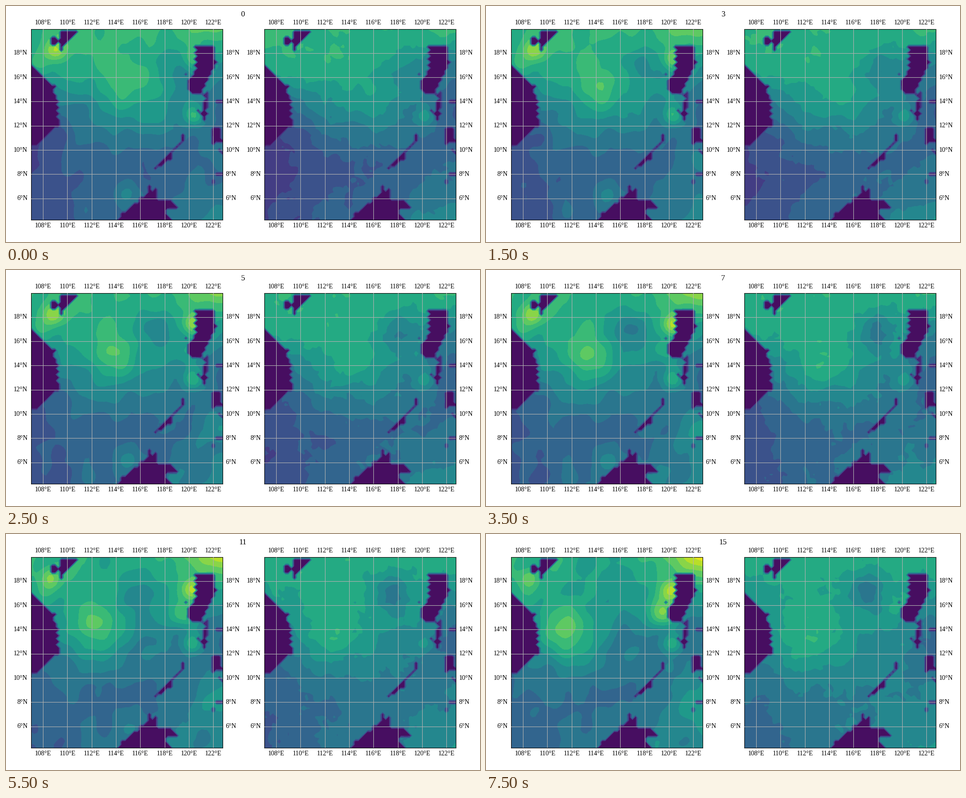
A matplotlib script for the animation above (8000 ms loop, 1000 px wide and 500 px high).

```python
import numpy as np
import matplotlib.pyplot as plt
from matplotlib.animation import FuncAnimation
from matplotlib.path import Path

plt.rcParams["font.family"] = "Liberation Serif"

FRAMES = 16
lon = 107 + np.arange(64) / 4
lat = 4.25 + np.arange(64) / 4
LON, LAT = np.meshgrid(lon, lat)
PTS = np.column_stack([LON.ravel(), LAT.ravel()])
KNOT_LON = np.array([107, 111, 116, 122.75])
KNOT_LAT = np.array([20, 17, 13, 9, 4.25])
WET = np.ones_like(LON)


def island(*coast):
    path = Path(coast + coast[:1])
    inside = path.contains_points(PTS, radius=0.02) | path.contains_points(PTS, radius=-0.02)
    WET[inside.reshape(WET.shape)] = 0


def strip(x0, y0, x1, y1, wet=0):
    """Thin chain of islands; a wet value above 0 makes it a shoal."""
    n = round(4 * max(abs(x1 - x0), abs(y1 - y0))) + 1
    for x, y in zip(np.linspace(x0, x1, n), np.linspace(y0, y1, n)):
        j, i = round((y - lat[0]) * 4), round((x - lon[0]) * 4)
        WET[j, i] = min(WET[j, i], wet)


def build_land():
    island((107, 17), (109, 15.25), (108.75, 15), (109.25, 14.25), (109.25, 12),
           (107.5, 10.5), (107, 10.5))
    island((108.75, 19.25), (109.25, 19.25), (109.5, 19.75), (110.75, 19.75),
           (109.5, 18.25), (109.25, 18.75), (108.75, 18.75))
    island((120.5, 18.5), (122, 18.5), (122.25, 17.25), (121, 14.75),
           (120.25, 14.75), (120, 15), (120, 15.75), (120.5, 16.5))
    island((120.75, 13.25), (121.5, 13), (121.25, 12.5))
    island((122, 11.75), (122.5, 11.75), (122.75, 10.75), (122, 10.5))
    island((117.5, 8.75), (117.75, 8.75), (118.5, 9.25), (118.5, 9.5), (118.25, 9.5))
    island((114.25, 4.25), (114.5, 4.75), (115.5, 5.5), (116, 5.5), (116, 6),
           (116.75, 6.5), (116.75, 7), (117, 6.5), (117.25, 6.75), (117.5, 5.75),
           (118.5, 5.75), (119, 5.25), (118, 5), (118.5, 4.25))
    strip(117.25, 8.5, 119.5, 10.75)
    strip(119.5, 10.75, 119.5, 11.25)
    strip(121.25, 14, 121.25, 13)
    strip(121.25, 14.5, 121.25, 14.5)
    strip(121.5, 14.75, 121.5, 13.5, 0.25)
    strip(122.25, 14, 122.75, 14)
    strip(122.5, 10, 122.75, 9.75)
    strip(122.25, 8, 122.75, 8)
    strip(122, 7.5, 122, 7.25, 0.25)
    strip(119.75, 16.25, 119.75, 16.25, 0.25)
    # saw-toothed west coasts: every other row is cut back
    odd = (LAT * 4) % 2 == 1
    WET[odd & (LON == 109.25) & (LAT > 12.5)] = 1
    WET[odd & (LON == 120.5) & (LAT > 16.5)] = 1


def basis(x, knots):
    """Weights of a cubic Hermite curve through values at the knots."""
    eye = np.eye(len(knots))
    slope = np.gradient(eye, knots, axis=0)
    i = np.clip(np.searchsorted(knots, x, side="right") - 1, 0, len(knots) - 2)
    h = np.diff(knots)[i][:, None]
    s = (x - knots[i])[:, None] / h
    return ((2 * s**3 - 3 * s**2 + 1) * eye[i] + (s**3 - 2 * s**2 + s) * h * slope[i]
            + (3 * s**2 - 2 * s**3) * eye[i + 1] + (s**3 - s**2) * h * slope[i + 1])


WX, WY = basis(lon, KNOT_LON), basis(-lat, -KNOT_LAT)


class Sea:
    """Background drifting between two states, with travelling eddies and ripples."""

    def __init__(self, first, last, eddies, seed, ripple, grain):
        self.first, self.last = (WY @ np.array(k) @ WX.T for k in (first, last))
        self.eddies = eddies
        rng = np.random.default_rng(seed)
        ang = rng.uniform(0, 2 * np.pi, 12)
        k = 2 * np.pi / rng.uniform(1.4, 4, 12)
        self.waves = list(zip(k * np.cos(ang), k * np.sin(ang),
                              rng.uniform(0, 2 * np.pi, 12), rng.uniform(-.2, .2, 12)))
        self.ripple = ripple
        g = rng.normal(size=LON.shape)
        self.grain = grain * (g + np.roll(g, 1, 1) + np.roll(g, 1, 0))

    def at(self, n):
        u = n / (FRAMES - 1)
        z = self.first + u * (self.last - self.first)
        for x0, y0, x1, y1, size, *amps in self.eddies:
            a = np.interp(n, (0, 7, 15), amps)
            dx, dy = LON - x0 - u * (x1 - x0), LAT - y0 - u * (y1 - y0)
            z = z + a * np.exp(-(dx**2 + dy**2) / (2 * size**2))
        for kx, ky, p, w in self.waves:
            z = z + self.ripple * np.sin(kx * LON + ky * LAT + p + w * n)
        return np.clip(z + self.grain, 1.1, 13.9) * WET


build_land()

# Eddy: start lon, lat, end lon, lat, size, strength at start, middle, end
left_sea = Sea(
    [[9.2, 9.6, 9.2, 10.3],
     [8.5, 8.8, 8.4, 7.0],
     [2.8, 5.8, 7.3, 4.9],
     [2.9, 4.3, 4.3, 5.0],
     [3.4, 4.2, 5.2, 6.3]],
    [[9.0, 8.6, 8.0, 13.2],
     [8.2, 8.2, 7.6, 8.0],
     [4.5, 8.2, 6.6, 5.2],
     [5.0, 5.3, 4.9, 7.2],
     [3.7, 5.0, 6.2, 6.5]],
    [(115.1, 15.6, 111.4, 14.0, 1.25, 1.8, 2.3, 2.0),
     (109, 18.3, 108.5, 18.2, 0.6, 3, 3.3, 2.4),
     (120.5, 17.5, 120.2, 17.2, 0.65, 2.2, 4.4, 4.6),
     (119.8, 15.2, 119.5, 15.4, 0.8, 0, 1.8, 4.5),
     (120.4, 12.8, 120.2, 12.8, 0.55, 3.4, 3, 3),
     (118.6, 17.2, 114.8, 16.6, 1.1, -0.9, -2.2, -0.5),
     (114.6, 6.5, 114.8, 6.1, 0.75, 1.7, 1.4, 0.2),
     (122.2, 9.3, 122.5, 7.8, 0.8, 0.3, 1.8, 0.6),
     (117.5, 12.4, 116.2, 13.3, 0.9, 0, -0.7, -1.3)],
    seed=4, ripple=0.09, grain=0.012)

right_sea = Sea(
    [[9.3, 9.0, 8.9, 9.4],
     [8.5, 8.8, 8.2, 5.6],
     [2.8, 5.6, 6.9, 4.1],
     [2.2, 3.4, 4.2, 4.8],
     [2.9, 3.8, 5.1, 6.7]],
    [[8.4, 8.7, 8.3, 9.0],
     [7.3, 8.2, 8.0, 7.3],
     [5.0, 8.2, 7.6, 4.8],
     [4.8, 5.8, 6.0, 6.2],
     [4.1, 5.0, 6.1, 7.1]],
    [(118.6, 16.8, 117, 17.1, 1, -0.5, -2.2, -2.7),
     (115.3, 14.9, 111.5, 13.4, 1.2, 0.3, 1.2, 0.4),
     (119.8, 15.8, 119.7, 15.7, 0.8, 0, 0.7, 1.3),
     (120.2, 12.8, 120.2, 12.8, 0.55, 2.2, 1.9, 0.9),
     (117.3, 13.2, 116.8, 13, 0.75, 0, -0.9, -1)],
    seed=9, ripple=0.06, grain=0.06)


def add_map(fig, left):
    ax = fig.add_axes([left, 0.095, 0.404, 0.808])
    ax.set(xlim=(107, 122.75), ylim=(4.25, 20))
    xs, ys = range(108, 123, 2), range(6, 19, 2)
    ax.set_xticks(xs, [f"{x}°E" for x in xs])
    ax.set_yticks(ys, [f"{y}°N" for y in ys])
    ax.tick_params(length=0, pad=5, labelsize=10, labeltop=True, labelright=True)
    for label in ax.get_yticklabels():
        label.set_va("center")
    ax.grid(color="#b0b0b0", lw=0.8)
    ax.set_axisbelow(False)
    return ax


fig = plt.figure(figsize=(10, 5), dpi=100)
maps = [(add_map(fig, 0.0525), left_sea), (add_map(fig, 0.5445), right_sea)]
title = fig.suptitle("0", fontsize=12)
drawn = []


def update(n):
    while drawn:
        drawn.pop().remove()
    for ax, sea in maps:
        drawn.append(ax.contourf(LON, LAT, sea.at(n), levels=np.arange(15),
                                 cmap="viridis", zorder=0.5))
    title.set_text(str(n))
    return drawn + [title]


anim = FuncAnimation(fig, update, frames=FRAMES, init_func=lambda: [],
                     interval=500, repeat=True, repeat_delay=0)
plt.show()
```
